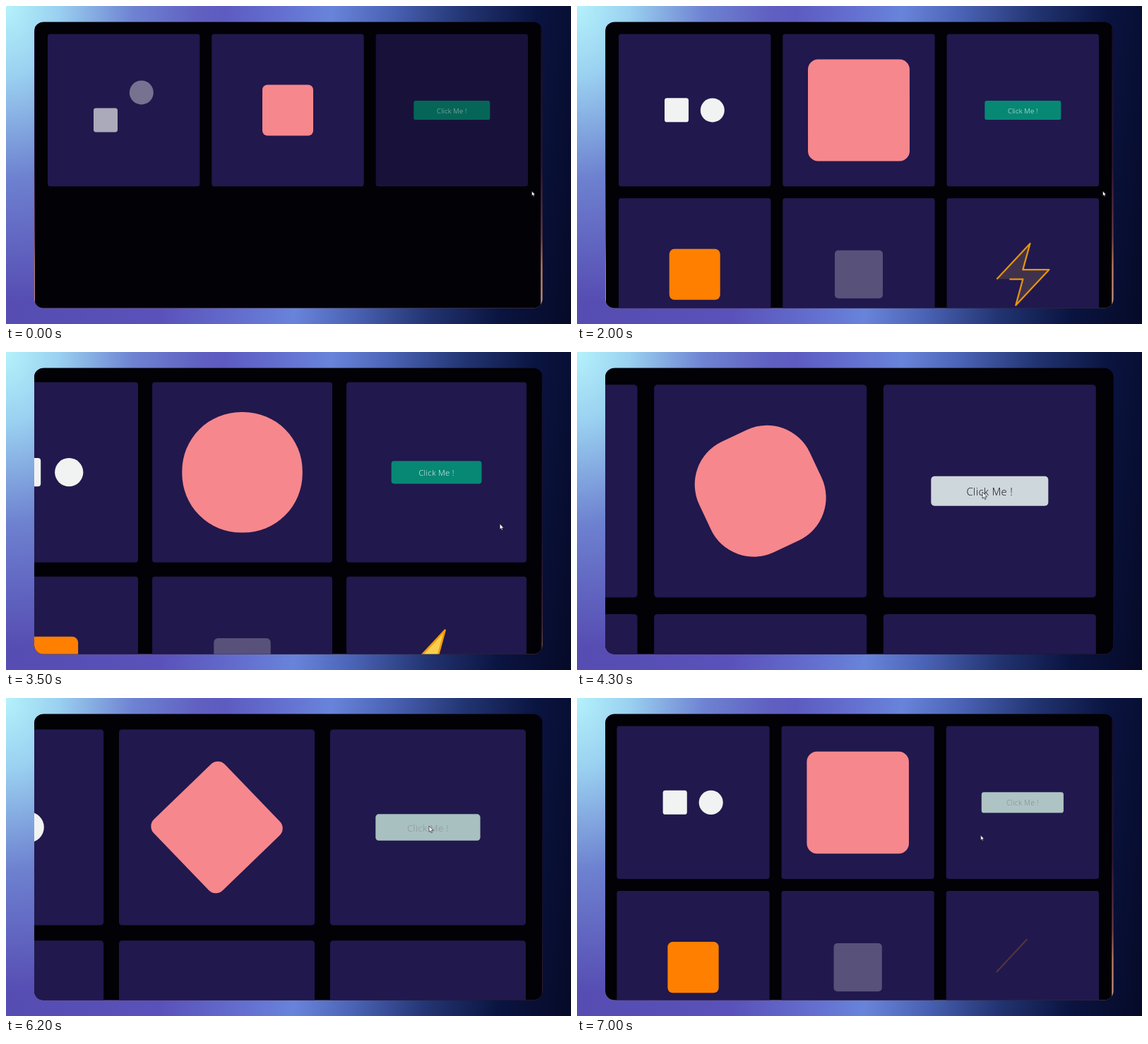
Animation of 800x450 px, one loop 7100 ms. Source, as an HTML page:

```html
<!DOCTYPE html>
<html lang="en">
<head>
<meta charset="utf-8">
<title>Motion cards</title>
<style>
  html, body { margin: 0; width: 100%; height: 100%; overflow: hidden; }
  body {
    background:
      radial-gradient(ellipse 310px 420px at 0 0, #b4f2fb 0%, rgba(160,220,246,.92) 24%, rgba(125,165,228,.6) 58%, rgba(92,84,186,0) 100%),
      linear-gradient(97deg, #554bb0 0%, #5a52ba 32%, #6470d0 46%, #6884da 54%, #4a62b4 64%, #223472 76%, #0a1440 88%, #060a28 100%);
  }
  svg { display: block; width: 800px; height: 450px; }
  text { font: 300 9.6px "Open Sans", "Noto Sans", sans-serif; letter-spacing: .24px; text-anchor: middle; }
</style>
</head>
<body>
<svg viewBox="0 0 800 450">
  <defs>
    <clipPath id="frame"><rect x="40" y="22.7" width="719.6" height="404.8" rx="13"/></clipPath>
    <linearGradient id="desk" x1="0" y1="0" x2="0" y2="1">
      <stop offset="0" stop-color="#120c2a"/>
      <stop offset=".5" stop-color="#2a1434"/>
      <stop offset=".75" stop-color="#6a3a44"/>
      <stop offset=".85" stop-color="#b87860"/>
      <stop offset="1" stop-color="#c49088"/>
    </linearGradient>
  </defs>
  <g clip-path="url(#frame)">
    <g id="view">
      <rect x="40" y="22" width="720" height="406" fill="url(#desk)"/>
      <rect x="41" y="22" width="716.2" height="406" fill="#020106"/>
      <g class="card">
        <rect id="square" x="65" y="90.5" width="34" height="34" rx="3.4" fill="#f0f3f1"/>
        <circle id="disc" cx="132.8" cy="107.6" r="17" fill="#f0f3f1"/>
      </g>
      <g class="card"><rect id="box" fill="#f6878d"/></g>
      <g class="card">
        <g id="button">
          <rect id="face" x="-54" y="-13.6" width="108" height="27.2" rx="3.2"/>
          <text id="label" x="0" y="4">Click Me !</text>
        </g>
      </g>
      <g class="card"><rect x="71.7" y="71.7" width="72" height="72" rx="7.2" fill="#ff8000"/></g>
      <g class="card"><rect x="73.7" y="73.7" width="68" height="68" rx="5" fill="#f9fafb" fill-opacity=".25"/></g>
      <g class="card">
        <path id="bolt" transform="translate(54 54) scale(4.48)" pathLength="1"
          d="M3.75 13.5l10.5-11.25L12 10.5h8.25L9.75 21.75 12 13.5H3.75z"
          stroke="#f59e0b" stroke-width=".5" stroke-linejoin="round"/>
      </g>
      <path id="cursor" d="M0 0V6.6L1.5 5.3 2.5 7.6 3.6 7.1 2.6 4.9H4.7Z"
        fill="#fff" stroke="#15101c" stroke-width=".5"/>
    </g>
  </g>
</svg>
<script>
const LOOP = 7100, STEP = 100;
const CARD = 215.4, PITCH = 232.3, MID = CARD / 2;
const ORIGIN = [749.5, 23.6], ZOOM = 0.4;
const $ = id => document.getElementById(id);
const cards = [...document.querySelectorAll('.card')];

const clamp = x => Math.max(0, Math.min(1, x));
const mix = (a, b, p) => a + (b - a) * p;

// cubic-bezier timing, solved by bisection
function bezier(x1, y1, x2, y2) {
  const at = (a, b, s) => 3 * a * s * (1 - s) ** 2 + 3 * b * s * s * (1 - s) + s ** 3;
  return x => {
    x = clamp(x);
    if (x === 0 || x === 1) return x;
    let lo = 0, hi = 1;
    for (let i = 0; i < 24; i++) {
      const s = (lo + hi) / 2;
      if (at(x1, x2, s) < x) lo = s; else hi = s;
    }
    return at(y1, y2, lo);
  };
}
const easeIn = bezier(.42, 0, 1, 1);
const easeOut = bezier(0, 0, .58, 1);
const easeInOut = bezier(.42, 0, .58, 1);
const soft = bezier(.25, .1, .35, 1);

// critically damped spring
const spring = ms => {
  const w = Math.max(0, ms) * .00706;
  return 1 - (1 + w) * Math.exp(-w);
};

// piecewise values with the easing applied per segment
function keys(values, x, ease) {
  const n = values.length - 1, i = Math.min(n - 1, Math.floor(x * n));
  return mix(values[i], values[i + 1], ease(x * n - i));
}

// forth and back: 2 s each way with 1 s rests
function mirror(t, ease) {
  if (t <= 0) return 0;
  const u = t % 6000;
  return u < 3000 ? ease(u / 2000) : ease(1 - (u - 3000) / 2000);
}

// colours blend in squared space
const blend = (a, b, p) =>
  `rgb(${a.map((v, i) => Math.round(Math.sqrt(mix(v * v, b[i] * b[i], p))))})`;

const PATH = [
  [3200, 744.5, 262], [3500, 707, 209], [4000, 628, 152], [4300, 624, 148.4],
  [5050, 626, 150], [5450, 614, 182], [5850, 620, 176], [6200, 632.5, 146],
  [6700, 630, 148], [7000, 572.3, 193.7]
];
function cursorAt(t) {
  const j = PATH.findIndex(k => k[0] > t);
  if (j === 0) return PATH[0].slice(1);
  if (j < 0) return PATH[PATH.length - 1].slice(1);
  const a = PATH[j - 1], b = PATH[j], p = easeInOut((t - a[0]) / (b[0] - a[0]));
  return [mix(a[1], b[1], p), mix(a[2], b[2], p)];
}

const HOVERS = [[3850, 5200], [6070, 6935]];
const hoverAt = t => HOVERS.reduce(
  (p, [enter, leave]) => p + soft((t - enter) / 300) - soft((t - leave) / 300), 0);

function enter(el, from, p) {
  el.setAttribute('transform', `translate(0 ${from * (1 - p)})`);
  el.setAttribute('opacity', p);
}

function draw(t) {
  const z = 1 + ZOOM * (spring(t - 3280) - spring(t - 6051));
  $('view').setAttribute('transform',
    `translate(${ORIGIN}) scale(${z}) translate(${-ORIGIN[0]} ${-ORIGIN[1]})`);

  cards.forEach((c, i) => c.setAttribute('opacity', soft((t + 650 - 250 * i) / 300)));
  enter($('square'), 42.5, easeOut((t + 485) / 1000));
  enter($('disc'), -42.5, easeOut((t + 275) / 1000));

  const x = Math.max(0, t - 356) % 5000 / 5000;
  const size = 72 * keys([1, 2, 2, 1], x, easeInOut);
  const box = $('box');
  box.setAttribute('x', -size / 2);
  box.setAttribute('y', -size / 2);
  box.setAttribute('width', size);
  box.setAttribute('height', size);
  box.setAttribute('rx', size * keys([.1, .1, .5, .1], x, easeInOut));
  box.setAttribute('transform',
    `translate(${MID} ${MID}) rotate(${keys([0, 90, 90, 0], x, easeInOut)})`);

  const h = hoverAt(t);
  $('button').setAttribute('transform', `translate(${MID} ${MID}) scale(${1 + .1 * h})`);
  $('face').setAttribute('fill', blend([7, 136, 116], [206, 215, 220], h));
  $('label').setAttribute('fill', blend([245, 250, 250], [10, 10, 20], h));

  const len = mirror(t - 350, easeInOut), bolt = $('bolt');
  bolt.setAttribute('stroke-dasharray', `${len} 2`);
  bolt.setAttribute('opacity', len);
  bolt.setAttribute('fill', `rgba(252,211,77,${mirror(t - 1350, easeIn)})`);

  $('cursor').setAttribute('transform', `translate(${cursorAt(t)})`);
}

cards.forEach((c, i) => {
  const bg = document.createElementNS('http://www.w3.org/2000/svg', 'rect');
  const attrs = { width: CARD, height: CARD, rx: 3.4, fill: '#21184d' };
  for (const k in attrs) bg.setAttribute(k, attrs[k]);
  c.prepend(bg);
  const place = document.createElementNS('http://www.w3.org/2000/svg', 'g');
  place.setAttribute('transform',
    `translate(${59 + PITCH * (i % 3)} ${39.8 + PITCH * Math.floor(i / 3)})`);
  c.replaceWith(place);
  place.append(c);
});

const start = performance.now();
function tick() {
  const t = (performance.now() - start) % LOOP;
  draw(Math.floor(t / STEP) * STEP);
  requestAnimationFrame(tick);
}
tick();
</script>
</body>
</html>
```
